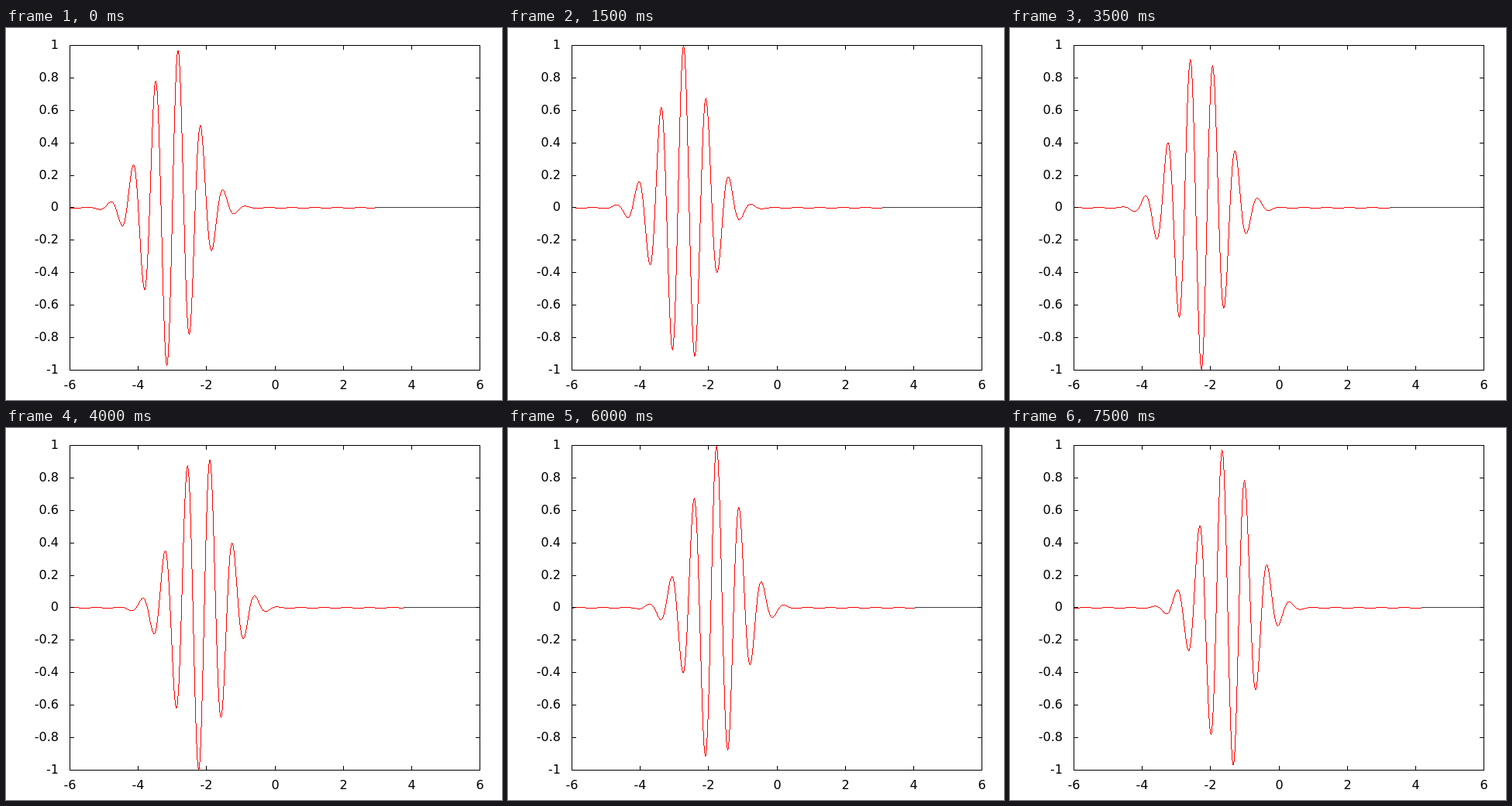
An HTML page with a canvas for the animation above (8000 ms loop, 640 by 480 pixels).

```html
<!DOCTYPE html>
<html lang="en">
<head>
<meta charset="utf-8">
<title>Wave packet</title>
<style>
  html, body { margin: 0; width: 100%; height: 100%; overflow: hidden; background: #fff; }
  canvas, svg { position: absolute; left: 0; top: 0; display: block; }
  text { font: 16px "DejaVu Sans", sans-serif; fill: #000; }
  path { stroke: #000; stroke-width: 1; fill: none; shape-rendering: crispEdges; }
</style>
</head>
<body>
<canvas id="plot" width="640" height="480"></canvas>
<svg id="axes" width="640" height="480" viewBox="0 0 640 480"></svg>
<script>
const LEFT = 82, RIGHT = 611, TOP = 22, BOTTOM = 441;
const TICK = 5, STEP = 500, STEPS = 16;
const RED = '#ff0000', FLAT = '#404040';

const ctx = document.getElementById('plot').getContext('2d');
const axes = document.getElementById('axes');

const toCol = x => Math.floor(LEFT + (x + 6) / 12 * (RIGHT - LEFT) + 0.5);
const toX = col => (col - LEFT) / (RIGHT - LEFT) * 12 - 6;
// Rows count upward before rounding, so a vanishing tail settles on the upper row.
const toRow = y => 479 - Math.floor((y + 1) * (BOTTOM - TOP) / 2 + 479 - BOTTOM + 0.5);

function add(tag, attrs, text = '') {
  const el = document.createElementNS('http://www.w3.org/2000/svg', tag);
  for (const key in attrs) el.setAttribute(key, attrs[key]);
  el.textContent = text;
  axes.append(el);
}

function drawAxes() {
  let d = `M${LEFT + .5} ${TOP + .5}H${RIGHT + .5}V${BOTTOM + .5}H${LEFT + .5}Z`;
  for (let x = -6; x <= 6; x += 2) {
    const c = toCol(x);
    d += `M${c + .5} ${BOTTOM}v${-TICK}M${c + .5} ${TOP + 1}v${TICK}`;
    add('text', { x: c + .5, y: 466, 'text-anchor': 'middle' }, x);
  }
  for (let i = -5; i <= 5; i++) {
    const r = toRow(i / 5);
    d += `M${LEFT + 1} ${r + .5}h${TICK}M${RIGHT} ${r + .5}h${-TICK}`;
    add('text', { x: 68, y: r + 5, 'text-anchor': 'end' }, i / 5);
  }
  add('path', { d });
}

// The envelope travels three times as fast as the crests.
function wave(x, n) {
  const u = x + 3 - n / 10;
  return Math.exp(-u * u) * Math.sin(3 * Math.PI * (x + 3) - n * Math.PI / 10);
}

// One-pixel line between neighbouring columns, without smoothing.
function link(col, a, b) {
  const len = Math.max(1, Math.abs(b - a));
  for (let i = 0; i <= len; i++) {
    const k = i / len;
    ctx.fillRect(col + Math.round(k), Math.round(a + (b - a) * k), 1, 1);
  }
}

function drawWave(n) {
  const rows = [];
  for (let col = LEFT; col <= RIGHT; col++) rows.push(toRow(wave(toX(col), n)));
  const zero = toRow(0);
  let end = rows.length - 1;
  while (end > 0 && rows[end] === zero) end--;

  ctx.clearRect(0, 0, 640, 480);
  ctx.fillStyle = FLAT;
  ctx.fillRect(LEFT + end + 1, zero, RIGHT - LEFT - end, 1);
  ctx.fillStyle = RED;
  for (let i = 0; i < end; i++) link(LEFT + i, rows[i], rows[i + 1]);
}

let shown = -1;
const start = performance.now();

function tick() {
  const n = Math.floor((performance.now() - start) / STEP) % STEPS;
  if (n !== shown) drawWave(shown = n);
  requestAnimationFrame(tick);
}

drawAxes();
tick();
</script>
</body>
</html>
```
